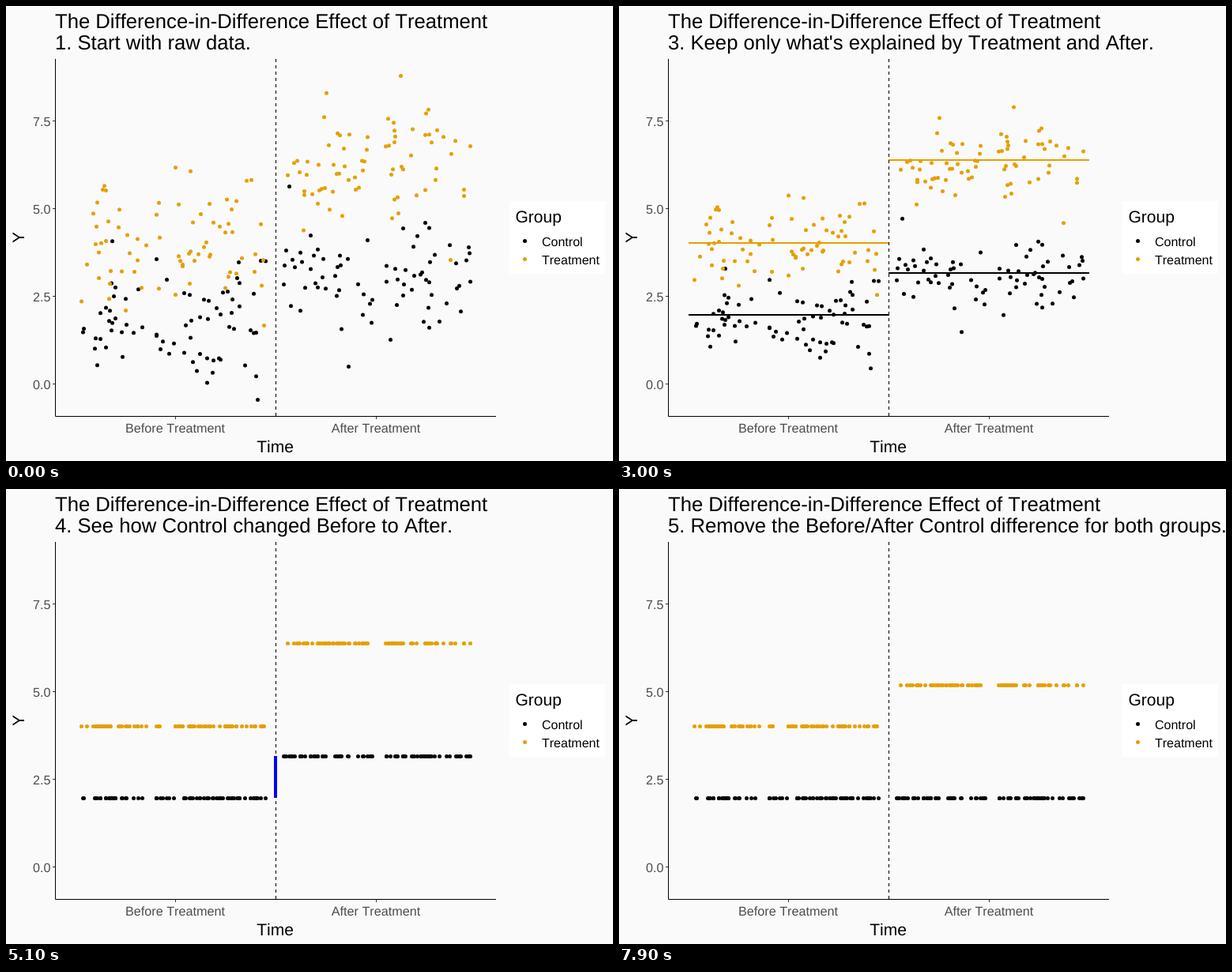
These frames come from a looping animation (768x576 px, 8 s). An HTML page:

```html
<!DOCTYPE html>
<html lang="en">
<head>
<meta charset="utf-8">
<title>Difference in Difference</title>
<style>
html, body { margin: 0; width: 100%; height: 100%; overflow: hidden; background: #fafafa; }
svg { display: block; width: 768px; height: 576px; }
text {
  font-family: "Liberation Sans", Arial, sans-serif;
  font-kerning: none;
  text-rendering: geometricPrecision;
}
.title { font-size: 25.65px; }
.label { font-size: 21px; }
.key { font-size: 16px; }
.tick { font-size: 16.2px; fill: #4d4d4d; }
.mid { text-anchor: middle; }
.end { text-anchor: end; }
.axis { stroke: #000; fill: none; }
.ticks { stroke: #333; }
</style>
</head>
<body>
<svg viewBox="0 0 768 576">
  <rect width="768" height="576" fill="#fafafa"/>
  <text class="title" x="62" y="28">The Difference-in-Difference Effect of Treatment</text>
  <text class="title" id="step" x="62" y="55"></text>

  <g id="dots"></g>
  <g id="means" stroke-width="2"></g>
  <path d="M341.5 519V67" stroke="#000" stroke-dasharray="4 4"/>
  <rect id="gap" x="339" width="4" fill="#00f"/>

  <path class="axis" d="M62.5 67V519.5H620"/>
  <path class="ticks" d="M59 145.5h3M59 256.5h3M59 367.5h3M59 478.5h3M214.5 520v3M468.5 520v3"/>
  <g class="tick end">
    <text x="56.5" y="152">7.5</text>
    <text x="56.5" y="263">5.0</text>
    <text x="56.5" y="374">2.5</text>
    <text x="56.5" y="485">0.0</text>
  </g>
  <g class="tick mid">
    <text x="214" y="540">Before Treatment</text>
    <text x="468" y="540">After Treatment</text>
  </g>
  <text class="label mid" x="340.5" y="565">Time</text>
  <text class="label mid" transform="translate(23 293) rotate(-90)">Y</text>

  <rect x="637" y="247" width="121" height="92" fill="#fff"/>
  <text class="label" x="644.5" y="274">Group</text>
  <circle cx="656.5" cy="297.5" r="2.5"/>
  <circle cx="656.5" cy="320.5" r="2.5" fill="#e69f00"/>
  <text class="key" x="678" y="304">Control</text>
  <text class="key" x="678" y="327">Treatment</text>
</svg>
<script>
const BLACK = '#000', GOLD = '#e69f00';
const LOOP = 8000, TICK = 100, SLIDE = 1200;
const DROP = 53, COUNT = 73, SPREAD = 72;

// Points lie between from and to, leaving out the stretch called hole.
const series = [
  { color: BLACK, mean: 391, from: 95, to: 333, hole: [178, 190], extremes: [[318, 498], [190, 320]] },
  { color: BLACK, mean: 338, from: 351, to: 587, hole: [464, 480], extremes: [[358, 228], [433, 456]], after: true },
  { color: GOLD, mean: 300, from: 95, to: 326, hole: [194, 213], extremes: [[214, 204], [326, 404]] },
  { color: GOLD, mean: 195, from: 351, to: 587, hole: [463, 479], extremes: [[499, 88], [562, 321]], after: true }
];

const steps = [
  [0, '1. Start with raw data.'],
  [500, '2. Explain Y using Treatment and After.'],
  [2600, "3. Keep only what's explained by Treatment and After."],
  [4700, '4. See how Control changed Before to After.'],
  [6800, '5. Remove the Before/After Control difference for both groups.']
];

const $ = id => document.getElementById(id);

function add(parent, tag, attrs) {
  const el = document.createElementNS('http://www.w3.org/2000/svg', tag);
  for (const k in attrs) el.setAttribute(k, attrs[k]);
  return parent.appendChild(el);
}

let seed = 7;
function rand() {
  seed = (seed + 0x6d2b79f5) | 0;
  let r = Math.imul(seed ^ (seed >>> 15), 1 | seed);
  r = (r + Math.imul(r ^ (r >>> 7), 61 | r)) ^ r;
  return ((r ^ (r >>> 14)) >>> 0) / 4294967296;
}

function scatter({ mean, from, to, hole: [start, end], extremes }) {
  const points = [...extremes];
  while (points.length < COUNT) {
    let x = from + rand() * (to - from - (end - start));
    if (x > start) x += end - start;
    // The sum of three uniform numbers is close to a bell curve.
    points.push([Math.round(x), mean + SPREAD * (rand() + rand() + rand() - 1.5)]);
  }
  return points;
}

const dots = [];
for (const s of series) {
  for (const [x, y] of scatter(s)) {
    const el = add($('dots'), 'circle', { cx: x + 0.5, r: 2.5, fill: s.color });
    dots.push({ el, s, offset: y - s.mean });
  }
  add($('means'), 'path', { d: `M${s.after ? 341 : 88} ${s.mean}h254`, stroke: s.color });
}

function slide(t, start) {
  const p = Math.max(0, Math.min(1, (t - start) / SLIDE));
  return (1 - Math.cos(Math.PI * p)) / 2;
}

let last = -1;
function draw(now) {
  const t = Math.floor((now % LOOP) / TICK) * TICK;
  if (t !== last) {
    last = t;
    const spread = 1 - slide(t, 2500);
    const drop = DROP * slide(t, 6700);
    for (const { el, s, offset } of dots) {
      el.setAttribute('cy', s.mean + 0.4 + offset * spread + (s.after ? drop : 0));
    }
    $('step').textContent = steps.filter(([at]) => at <= t).pop()[1];
    $('means').setAttribute('visibility', t >= 900 && t < 4700 ? 'visible' : 'hidden');
    $('gap').setAttribute('y', 338 + drop);
    $('gap').setAttribute('height', t >= 5100 ? DROP - drop : 0);
  }
  requestAnimationFrame(draw);
}
draw(performance.now());
</script>
</body>
</html>
```
